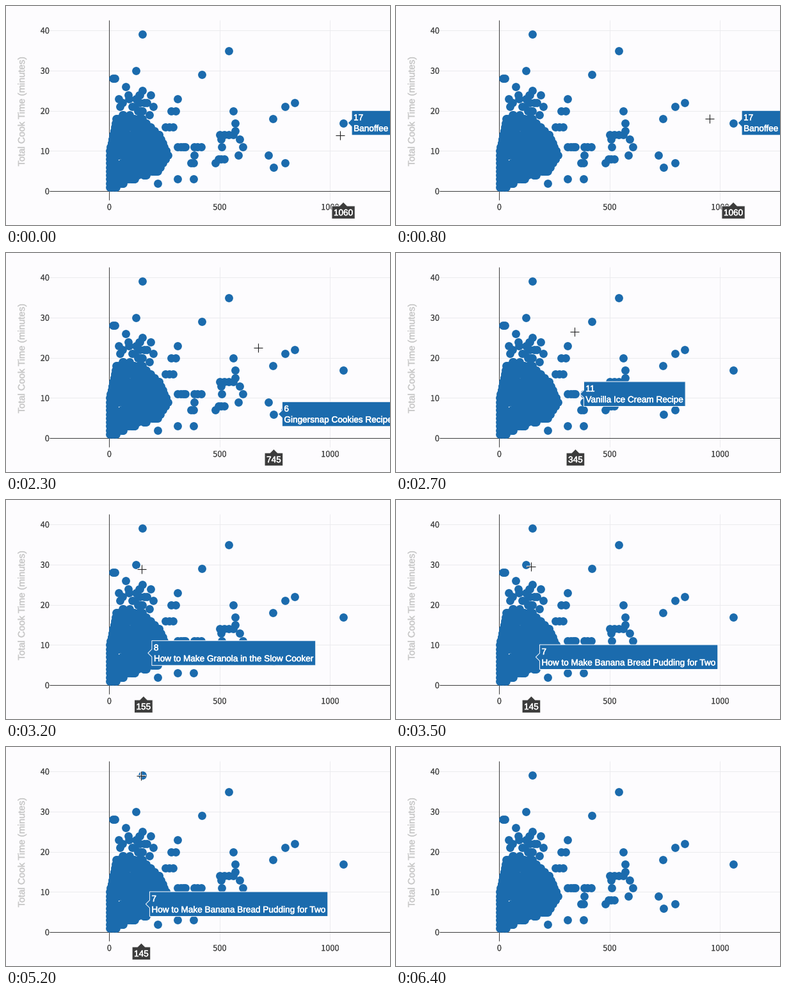
Recreate the animation shown at these times as a matplotlib script. Size 600 px wide and 342 px high, loop 8000 ms.

```python
import numpy as np
import matplotlib.pyplot as plt
from matplotlib.animation import FuncAnimation
from matplotlib.patches import Polygon
from matplotlib.patheffects import withStroke

W, H, DPI = 600, 342, 100
PX = 72 / DPI  # points per pixel
BLUE, DARK, GRID, PAPER = "#1b6bad", "#3c3c3c", "#ebebee", "#fdfcfe"
SANS, TICK = "Liberation Sans", "Noto Sans CJK JP"

plt.rcParams["text.hinting"] = "none"
fig = plt.figure(figsize=(W / DPI, H / DPI), dpi=DPI, facecolor=PAPER)
ax = fig.add_axes([0, 0, 1, 1])
# Whole coordinates name the middle of a pixel edge pair
ax.set(xlim=(0.6, W + 0.6), ylim=(H + 0.6, 0.6))
ax.axis("off")


def to_x(value):
    return 162 + 0.345 * value


def to_y(value):
    return 289.8 - 6.275 * value


def write(x, y, text, size, color, font=SANS, bold=0.0, **kw):
    return ax.text(x, y, text, fontsize=size * PX, color=color, family=font,
                   path_effects=[withStroke(linewidth=bold, foreground=color)],
                   **kw)


def line(xs, ys, color, z):
    ax.plot(xs, ys, color=color, lw=PX, zorder=z, solid_capstyle="butt")


# Axes, grid and tick labels
for v in (0, 500, 1000):
    x = to_x(v)
    line([x, x], [23, 304], GRID if v else DARK, 1 if v else 2)
    write(x, 319, v, 12.8, "#444444", TICK, ha="center", va="baseline")
for v in range(0, 41, 10):
    y = to_y(v)
    line([69, W + 1], [y, y], GRID if v else DARK, 1 if v else 2)
    write(68.5, y + 4.8, v, 12.8, "#444444", TICK, ha="right", va="baseline")
write(25.8, 165.3, "Total Cook Time (minutes)", 14.75, "#c8c8c8", bold=0.2,
      rotation=90, ha="center", va="center")

# Points that get a label: value, minutes, name
RECIPES = [
    (1060, 17, "Banoffee Pie Recipe"),
    (840, 22, "Triple Chocolate Cheesecake Recipe"),
    (795, 21, "Classic Fruit Cake Recipe"),
    (745, 6, "Gingersnap Cookies Recipe"),
    (605, 11, "Sticky Toffee Pudding Recipe"),
    (510, 11, "Layered Honey Cake Recipe"),
    (345, 11, "Vanilla Ice Cream Recipe"),
    (255, 10, "Cherry Pie Recipe"),
    (155, 8, "How to Make Granola in the Slow Cooker"),
    (145, 7, "How to Make Banana Bread Pudding for Two"),
    (135, 7, "Easy Lemon Pudding Recipe"),
]
# Far points, and short rows of neighbours (first, last, minutes)
LONERS = [(150, 39), (540, 35), (420, 29), (120, 30), (742, 18), (720, 9),
          (795, 7), (560, 20), (570, 17), (570, 15), (590, 13), (505, 13),
          (585, 9), (480, 7), (310, 23), (310, 3), (380, 3), (385, 9),
          (220, 2), (75, 26), (150, 25)]
ROWS = [(15, 25, 28), (280, 300, 20), (255, 290, 16), (500, 560, 14),
        (310, 335, 11), (385, 415, 11), (495, 520, 8), (370, 380, 7),
        (2, 30, 1)]


def scatter_points():
    """A crowd bulging at nine minutes, thin fringe above, far points."""
    rng = np.random.default_rng(4)
    points = [r[:2] for r in RECIPES] + LONERS
    for first, last, minutes in ROWS:
        count = 2 + (last - first) // 25
        points += [(v, minutes) for v in np.linspace(first, last, count)]
    for minutes in range(2, 19):
        low = np.interp(minutes, [10, 18], [2, 32])
        high = np.interp(minutes, [1, 5, 9, 14, 20], [10, 220, 265, 225, 110])
        inner = rng.uniform(low, high, int((high - low) / 7))
        points += [(v, minutes) for v in (low, *inner, high)]
    for minutes in range(19, 25):
        points += [(v, minutes) for v in rng.uniform(30, 200, 4)]
    return np.array(points).T


values, minutes = scatter_points()
ax.scatter(to_x(values), to_y(minutes), s=(12.8 * PX) ** 2, c=BLUE, lw=0,
           zorder=3)


def smooth(p):
    return p * p * (3 - 2 * p)


def ease_in(p):
    return p ** 2


def ease_out(p):
    return 1 - (1 - p) ** 1.7


# Pointer moves: first frame, last frame, goal, easing
START = np.array([523, 203])
MOVES = [
    (0, 3, (508, 186), smooth),
    (6, 11, (458, 160), smooth),
    (14, 23, (395, 149), ease_in),
    (23, 32, (213, 109), ease_out),
    (32, 36, (211, 104), smooth),
    (44, 45, (208, 104), smooth),
    (45, 52, (212, 46), smooth),
    (59, 63, (212, 10), ease_in),
]
HOVER_END = 64
LAG = 0.5  # frames by which the label trails the pointer


def pointer_at(frame):
    place = START
    for first, last, goal, ease in MOVES:
        p = np.clip((frame - first) / (last - first), 0, 1)
        place = place + (np.array(goal) - place) * ease(p)
    return place


def recipe_at(frame):
    x = pointer_at(max(frame - LAG, 0))[0]
    return min(RECIPES, key=lambda r: abs(to_x(r[0]) - x))


def balloon(color):
    return ax.add_patch(Polygon([(0, 0)] * 3, fc=color, ec=PAPER, lw=PX,
                                joinstyle="miter", zorder=5))


def caption(**kw):
    return write(0, 0, "", 13.6, "white", bold=0.35, va="baseline", zorder=6,
                 **kw)


tip_box, axis_box = balloon(BLUE), balloon(DARK)
tip_value, tip_name = caption(), caption()
axis_value = caption(ha="center")
pointer = [ax.plot([], [], "+", color=c, ms=size * PX, mew=w * PX, zorder=7)[0]
           for c, size, w in ((PAPER, 15, 2.4), ("#222222", 13.5, 1.1))]
moving = [tip_box, axis_box, tip_value, tip_name, axis_value, *pointer]


def text_width(text):
    box = text.get_window_extent()
    return abs(box.transformed(ax.transData.inverted()).width)


def show_tip(x, y, minutes, name):
    left, half = x + 13, 19.3
    tip_value.set(text=str(minutes), position=(left + 3, y - 4))
    tip_name.set(text=name, position=(left + 3, y + 13))
    right = left + text_width(tip_name) + 6
    tip_box.set_xy([(x + 7, y), (left, y + 6), (left, y + half),
                    (right, y + half), (right, y - half), (left, y - half),
                    (left, y - 6)])


def show_axis_value(x, value):
    axis_value.set(text=str(value), position=(x, 327.7))
    half = text_width(axis_value) / 2 + 3
    top, bottom = 312.7, 333
    axis_box.set_xy([(x, top - 6), (x + 6, top), (x + half, top),
                     (x + half, bottom), (x - half, bottom), (x - half, top),
                     (x - 6, top)])


def update(frame):
    visible = frame < HOVER_END
    for artist in moving:
        artist.set_visible(visible)
    if visible:
        value, minutes, name = recipe_at(frame)
        show_tip(to_x(value), to_y(minutes), minutes, name)
        show_axis_value(to_x(value), value)
        x, y = pointer_at(frame)
        for mark in pointer:
            mark.set_data([x], [y])
    return moving


anim = FuncAnimation(fig, update, frames=80, interval=100, repeat=True)
plt.show()
```
